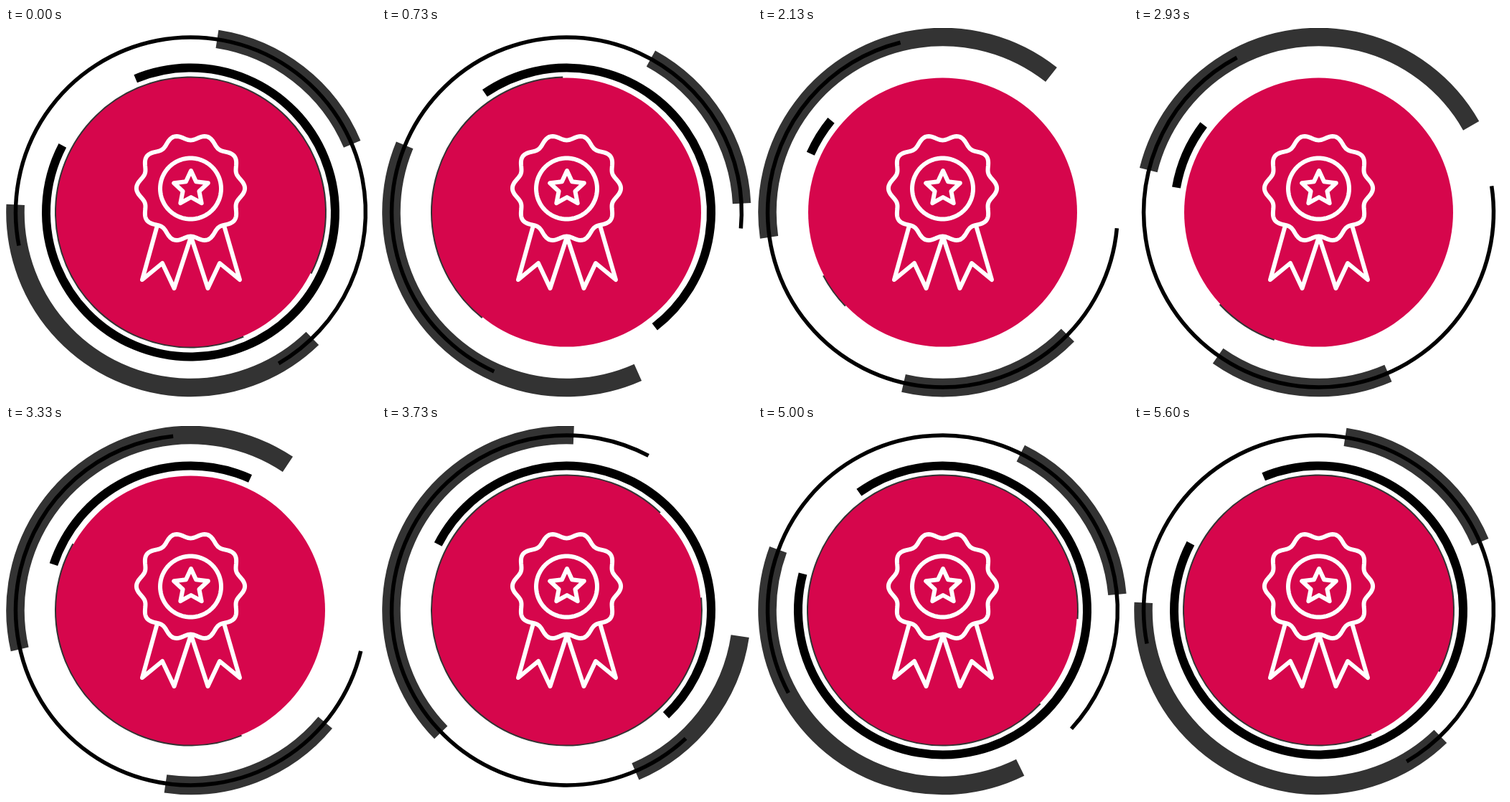
Animation, 516 px wide and 516 px high, one loop 5630 ms. Source, as an HTML page with a canvas:

```html
<!DOCTYPE html>
<html lang="en">
<head>
<meta charset="utf-8">
<title>Award badge</title>
<style>
html, body { margin: 0; width: 100%; height: 100%; overflow: hidden; background: #fff; }
canvas { display: block; }
</style>
</head>
<body>
<canvas id="stage" width="516" height="516"></canvas>
<script>
const ctx = document.getElementById('stage').getContext('2d');
const CX = 257.5, CY = 257, LOOP = 5630, END = 5600, HALF = END / 2;
const RED = '#d6064c', GREY = '#333';

const smooth = u => u * u * (3 - 2 * u);
const linear = u => u;

// Stops are [time, value, bend]; a bend below 1 hurries the way to its stop
function path(t, stops, ease = smooth) {
  const i = Math.max(1, stops.findIndex(stop => t <= stop[0]));
  const [t0, v0] = stops[i - 1], [t1, v1, bend = 1] = stops[i];
  return v0 + (v1 - v0) * ease(((t - t0) / (t1 - t0)) ** bend);
}

// Angles in degrees, clockwise from three o'clock
const greyTurn = t => path(t, [[0, 0], [HALF, 151, 1.1], [4200, 72, 0.9], [END, 0, 0.7]]);
const thinStart = t => path(t, [[0, 169], [HALF, -11, 0.75], [END, 169, 0.88]]);
const boldStart = t => path(t, [[0, 247.6], [HALF, 187, 1.2], [END, 247.6]], linear);
const boldLength = t => path(t, [[0, 320], [2500, 8, 0.61], [4400, 320, 1.27], [END, 320]]);
const rimMiddle = t => path(t, [[0, 227], [HALF, 118], [END, 227]], linear);
const rimLength = t => path(t, [[0, 320], [1300, 16], [2500, 16], [3750, 320, 2], [END, 320]]);

function ring(radius, width, color, start, length) {
  const rad = Math.PI / 180;
  ctx.beginPath();
  ctx.arc(CX, CY, radius, start * rad, (start + length) * rad);
  ctx.lineWidth = width;
  ctx.strokeStyle = color;
  ctx.stroke();
}

// Closed outline whose radius depends on the angle
function polar(x, y, count, radius) {
  const outline = new Path2D();
  for (let i = 0; i < count; i++) {
    const a = i / count * 2 * Math.PI, r = radius(a, i);
    outline.lineTo(x + r * Math.sin(a), y - r * Math.cos(a));
  }
  outline.closePath();
  return outline;
}

const medal = new Path2D();
medal.addPath(polar(CX, 223.5, 240, a => 71.3 - 4.3 * Math.cos(10 * a)));
medal.addPath(polar(CX, 224, 120, () => 42.5));
medal.addPath(polar(258, 224, 10, (a, i) => i % 2 ? 12 : 25));
medal.addPath(new Path2D('M210.5 277L190 351L218 328L234.5 363L258 291L281.5 363L298 328L326 351L304.5 277'));

function draw(t) {
  ctx.fillStyle = '#fff';
  ctx.fillRect(0, 0, 516, 516);
  ctx.lineCap = 'butt';

  const turn = greyTurn(t), rim = rimLength(t);
  ring(244.5, 25.5, GREY, turn - 81.3, 58.4);
  ring(244.5, 25.5, GREY, turn + 46, 136.5);
  ring(244, 5.5, '#000', thinStart(t), 250.8);
  ring(201.5, 12, '#000', boldStart(t), boldLength(t));
  ring(188, 3, GREY, rimMiddle(t) - rim / 2, rim);

  ctx.beginPath();
  ctx.arc(CX, CY, 187.5, 0, 2 * Math.PI);
  ctx.fillStyle = RED;
  ctx.fill();

  ctx.lineWidth = 6;
  ctx.lineCap = ctx.lineJoin = 'round';
  ctx.strokeStyle = '#fff';
  ctx.stroke(medal);
}

const origin = performance.now();
function frame() {
  const elapsed = Math.max(0, performance.now() - origin);
  draw(Math.min(elapsed % LOOP, END));
  requestAnimationFrame(frame);
}
frame();
</script>
</body>
</html>
```
